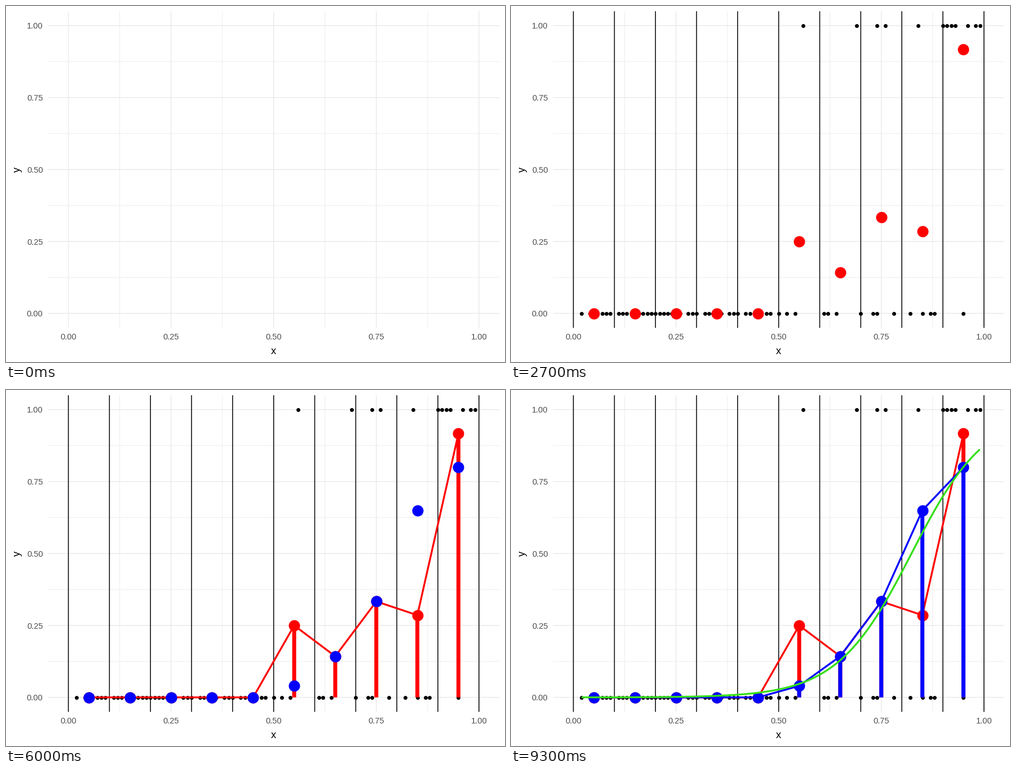
Animation of 885 by 632 pixels, one loop 10 s. Source, as a matplotlib script:

```python
import numpy as np
import matplotlib.pyplot as plt
from matplotlib.animation import FuncAnimation

W, H, DPI = 885, 632, 100
PT = 72 / DPI                                   # points per pixel
LEFT, RIGHT, TOP, BOTTOM = 74.2, 875.2, 9.3, 571.4
STEP, FIRST, STAGE = 100, 500, 1100             # timing in ms

plt.rcParams["font.family"] = "Liberation Sans"
fig = plt.figure(figsize=(W / DPI, H / DPI), dpi=DPI, facecolor="white")
ax = fig.add_axes([0, 0, 1, 1])
ax.set(xlim=(0, W), ylim=(H, 0))
ax.axis("off")


def px(x):
    return 110.6 + 728.2 * np.asarray(x)


def py(y):
    return 545.7 - 510.8 * np.asarray(y)


def line(xs, ys, color, width):
    return ax.plot(xs, ys, color=color, lw=width * PT, snap=False,
                   solid_capstyle="butt", solid_joinstyle="round")


def dots(x, y, color, diameter):
    return ax.plot(px(x), py(y), "o", color=color, ms=diameter * PT, mew=0, snap=False)


def stems(x, y, color):
    return [a for u, v in zip(x, y)
            for a in line([px(u)] * 2, [py(0), py(v)], color, 7)]


def curve(x, y, color):
    return line(px(x), py(y), color, 3.3)


def rule_x(x, color, width):
    return line([px(x)] * 2, [TOP, BOTTOM], color, width)


def rule_y(y, color, width):
    return line([LEFT, RIGHT], [py(y)] * 2, color, width)


# Grid and axis labels
for v in np.arange(0.125, 1, 0.25):
    rule_x(v, "#EBEBEB", 0.9)
    rule_y(v, "#EBEBEB", 0.9)
for v in np.linspace(0, 1, 5):
    rule_x(v, "#EBEBEB", 1.5)
    rule_y(v, "#EBEBEB", 1.5)
    style = dict(color="#4D4D4D", size=14.67 * PT, va="baseline")
    ax.text(px(v), 592.2, f"{v:.2f}", ha="center", **style)
    ax.text(65.6, py(v) + 5.6, f"{v:.2f}", ha="right", **style)
title = dict(color="black", size=18.33 * PT, ha="center", va="baseline")
ax.text(px(0.5), 617.7, "x", **title)
ax.text(25, py(0.5), "y", rotation=90, rotation_mode="anchor", **title)

# Data
zeros = np.array([2, 4, 5, 7, 8, 9, 11, 12, 13, *range(16, 27), 28, 29, 30,
                  *range(32, 37), 38, 39, 40, 42, 43, 45, 47, 48, 50, 52, 54,
                  61, 62, 64, 70, 73, 74, 78, 82, 85, 87, 88, 95]) / 100
ones = np.array([56, 69, 74, 76, 84, 90, 91, 92, 93, 96, 98, 99]) / 100
mids = np.arange(0.05, 1, 0.1)
red = np.array([0] * 5 + [1 / 4, 1 / 7, 1 / 3, 2 / 7, 11 / 12])
blue = np.array([0] * 5 + [0.04, 1 / 7, 1 / 3, 0.65, 0.8])
fit_x = np.linspace(0.02, 0.99, 98)
fit_y = 1 / (1 + np.exp(-11 * (fit_x - 0.8235)))

# Layers in the order they appear
layers = [
    dots(zeros, 0 * zeros, "black", 6.9) + dots(ones, 0 * ones + 1, "black", 6.9),
    [a for v in np.linspace(0, 1, 11) for a in rule_x(v, "black", 1.5)],
    dots(mids, red, "red", 20),
    stems(mids[5:], red[5:], "red"),
    curve(mids, red, "red"),
    dots(mids, blue, "blue", 20),
    stems(mids[5:], blue[5:], "blue"),
    curve(mids, blue, "blue"),
    curve(fit_x, fit_y, "#34DF18"),
]


def draw(i):
    shown = (i * STEP - FIRST) // STAGE + 1
    for k, layer in enumerate(layers):
        for artist in layer:
            artist.set_visible(k < shown)
    return []


anim = FuncAnimation(fig, draw, frames=100, interval=STEP, repeat=True, repeat_delay=0)
plt.show()
```
